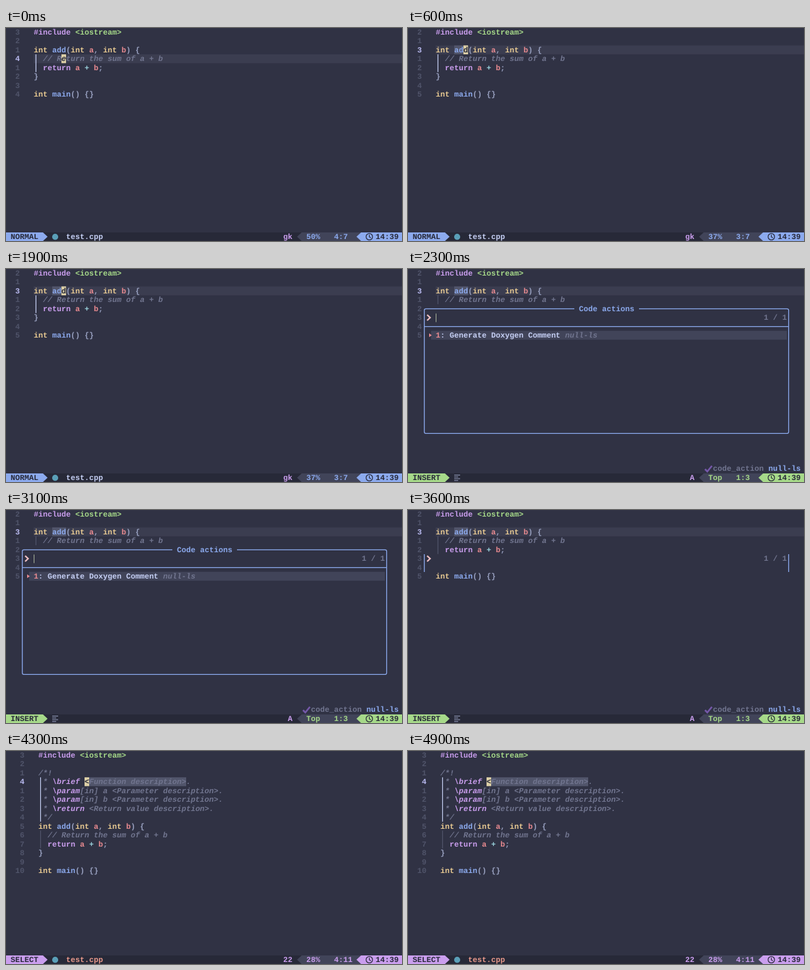
An HTML page that plays this animation: 600 by 323 pixels, repeating every 5000 ms.

```html
<!DOCTYPE html>
<html lang="en">
<head>
<meta charset="utf-8">
<title>Editor code action</title>
<style>
html, body { margin: 0; height: 100%; overflow: hidden; background: #303244; }
svg { display: block; width: 600px; height: 323px; }
text {
  font: bold 11.667px "Liberation Mono", "Noto Sans Mono", monospace;
  white-space: pre; text-rendering: geometricPrecision; fill: #c6d0f5;
}
.scene { visibility: hidden; animation: 5s step-end infinite; }
#comment { animation-name: comment; }
#symbol { animation-name: symbol; }
#picker { animation-name: picker; }
#closing { animation-name: closing; }
#snippet { animation-name: snippet; }
@keyframes comment { 0% { visibility: visible } 6%, 100% { visibility: hidden } }
@keyframes symbol { 0% { visibility: hidden } 6% { visibility: visible } 42%, 100% { visibility: hidden } }
@keyframes picker { 0% { visibility: hidden } 42% { visibility: visible } 70%, 100% { visibility: hidden } }
@keyframes closing { 0% { visibility: hidden } 70% { visibility: visible } 76%, 100% { visibility: hidden } }
@keyframes snippet { 0% { visibility: hidden } 76%, 100% { visibility: visible } }
</style>
</head>
<body>
<svg id="stage" viewBox="0 0 600 323"></svg>
<script>
(() => {
const CELL = 7, ROW = 13.46;
const C = {
  bg: '#303244', bar: '#272938', line: '#3b3d50', panel: '#414459', pick: '#51556b',
  dim: '#50546a', grey: '#71758f', punct: '#979fbe', text: '#c6d0f5', current: '#babbf1',
  mauve: '#ca9eee', blue: '#8caaee', green: '#a6d989', yellow: '#e8ca92', red: '#e88a90',
  sky: '#99d1db', peach: '#ea9a8c', cursor: '#dccfa6', icon: '#5a9fb8', dark: '#262838'
};
const rowTop = row => row * ROW - 0.5;
const esc = s => s.replace(/&/g, '&amp;').replace(/</g, '&lt;');
const rect = (x, y, w, h, fill) => `<rect x="${x}" y="${y}" width="${w}" height="${h}" fill="${fill}"/>`;
const path = (d, fill, stroke = 'none', width = 1) =>
  `<path d="${d}" fill="${fill}" stroke="${stroke}" stroke-width="${width}"/>`;
const text = (row, col, str, color, italic) =>
  `<text x="${col * CELL}" y="${10 + row * ROW}" style="fill:${color}${italic ? ';font-style:italic' : ''}">${esc(str)}</text>`;
const cells = (row, col, n, color) => rect(col * CELL, rowTop(row), n * CELL, ROW, color);
const cursorLine = (row, col) => rect(col * CELL, rowTop(row), 600, ROW, C.line);
const guide = (col, from, to, color) =>
  rect(col * CELL + 2.8, rowTop(from), 1.2, (to - from + 1) * ROW, color);

// parts: "color:text" pieces laid out one after another
function line(row, col, parts, italic) {
  return parts.map(part => {
    const at = part.indexOf(':'), str = part.slice(at + 1);
    const out = text(row, col, str, C[part.slice(0, at)], italic);
    col += str.length;
    return out;
  }).join('');
}

const cursor = (row, col, char, italic) =>
  cells(row, col, 1, C.cursor) + text(row, col, char, C.dark, italic);

function numbers(count, current, actual, col) {
  let out = '';
  for (let row = 0; row < count; row++) {
    const here = row === current;
    const n = String(here ? actual : Math.abs(row - current));
    out += text(row, col + 1 - n.length, n, here ? C.current : C.dim);
  }
  return out;
}

const include = col => line(0, col, ['mauve:#include ', 'green:<iostream>']);
const signature = (row, col) => line(row, col, ['yellow:int ', 'blue:add', 'punct:(', 'yellow:int ', 'red:a',
  'punct:, ', 'yellow:int ', 'red:b', 'punct:) {']);
const note = (row, col) => text(row, col + 2, '// Return the sum of a + b', C.grey, true);
const result = (row, col) => line(row, col + 2, ['mauve:return ', 'red:a ', 'sky:+ ', 'red:b', 'punct:;']);
const brace = (row, col) => text(row, col, '}', C.punct);
const main = (row, col) => line(row, col, ['yellow:int ', 'blue:main', 'punct:() {}']);
const body = (row, col) => signature(row, col) + note(row + 1, col) + result(row + 2, col) +
  brace(row + 3, col) + main(row + 5, col);

function statusBar(mode, color, keys, percent, pos, fileColor) {
  const y = 310, mid = 316.5;
  const out = rect(0, y, 600, 13, C.bar) +
    path(`M0 ${y}H56L63 ${mid}L56 323H0Z`, color) +
    path(`M448 ${y}H540V323H448L441 ${mid}Z`, C.panel) +
    path(`M538 ${y}H600V323H538L531 ${mid}Z`, color) +
    text(23, 1, mode, C.dark) +
    text(23, 62 - keys.length, keys, C.mauve) +
    text(23, 65, percent, color) + text(23, 71, pos, color) + text(23, 80, '14:39', C.dark) +
    `<circle cx="550.5" cy="316.5" r="4.9" fill="none" stroke="${C.dark}" stroke-width="1.2"/>` +
    path('M550.5 313.4V316.8L552.8 318.2', 'none', C.dark, 1.1);
  return out + (fileColor
    ? `<circle cx="74.5" cy="316.7" r="4.6" fill="${C.icon}"/>` + text(23, 13, 'test.cpp', fileColor)
    : path('M70 312.5H79M70 315.2H76M70 318H79M70 320.8H76', 'none', C.punct, 1.1));
}

const normal = (percent, pos) => statusBar('NORMAL', C.blue, 'gk', percent, pos, C.text);
const insert = () => statusBar('INSERT', C.green, 'A', 'Top', '1:3') +
  path('M450 303.5L453.5 307L460.5 298.5', 'none', '#7458a8', 2.6) +
  line(22, 66, ['grey:code_action ', 'blue:null-ls']);
const promptLine = () => path('M29 69.5L33.5 73.8L29 78', 'none', '#f0c0c4', 2.2) +
  text(5, 77, '1 / 1', C.grey);

const scenes = {
  comment: cursorLine(3, 6) + numbers(8, 3, 4, 2) + include(6) + body(2, 6) +
    guide(6, 3, 4, C.text) + cursor(3, 12, 'e', true) + normal('50%', '4:7'),

  symbol: cursorLine(2, 6) + cells(2, 10, 3, C.pick) + numbers(8, 2, 3, 2) + include(6) + body(2, 6) +
    guide(6, 3, 4, C.text) + cursor(2, 12, 'd') + normal('37%', '3:7'),

  picker: cursorLine(2, 6) + cells(2, 10, 3, C.pick) + numbers(8, 2, 3, 2) + include(6) +
    signature(2, 6) + note(3, 6) + guide(6, 3, 3, C.dim) +
    path('M252 60.3H27Q24.7 60.3 24.7 62.5V247Q24.7 249.3 27 249.3H574.5Q576.7 249.3 576.7 247V62.5Q576.7 60.3 574.5 60.3H350M24.7 87.4H576.7',
      'none', C.blue, 1.3) +
    text(4, 37, 'Code actions', C.blue) + promptLine() + rect(42, 67.5, 1, 13, '#a9b39a') +
    rect(35, rowTop(7), 539, ROW, C.panel) + path('M32 97.6L36 100.4L32 103.2Z', C.red) +
    line(7, 6, ['red:1', 'text:: Generate Doxygen Comment']) +
    text(7, 34, 'null-ls', C.grey, true) + insert(),

  closing: cursorLine(2, 6) + cells(2, 10, 3, C.pick) + numbers(8, 2, 3, 2) + include(6) +
    signature(2, 6) + note(3, 6) + result(4, 6) + main(7, 6) + guide(6, 3, 4, C.dim) +
    path('M24.7 67V94M576.7 67V94', 'none', C.blue, 1.3) + promptLine() + insert(),

  snippet: cells(3, 18, 21, C.pick) + numbers(14, 3, 4, 3) + include(7) +
    text(2, 7, '/*!', C.grey, true) +
    [['\\brief', ' <Function description>.'],
     ['\\param', '[in] a <Parameter description>.'],
     ['\\param', '[in] b <Parameter description>.'],
     ['\\return', ' <Return value description>.']].map(([tag, rest], i) =>
      line(3 + i, 8, ['grey:* ', 'mauve:' + tag, 'grey:' + rest], true)).join('') +
    text(7, 8, '*/', C.grey, true) + body(8, 7) +
    guide(7, 3, 7, C.text) + guide(7, 9, 10, C.dim) + cursor(3, 17, '<', true) +
    statusBar('SELECT', C.mauve, '22', '28%', '4:11', C.peach)
};

document.getElementById('stage').innerHTML = rect(0, 0, 600, 323, C.bg) +
  Object.entries(scenes).map(([id, art]) => `<g id="${id}" class="scene">${art}</g>`).join('');
})();
</script>
</body>
</html>
```
